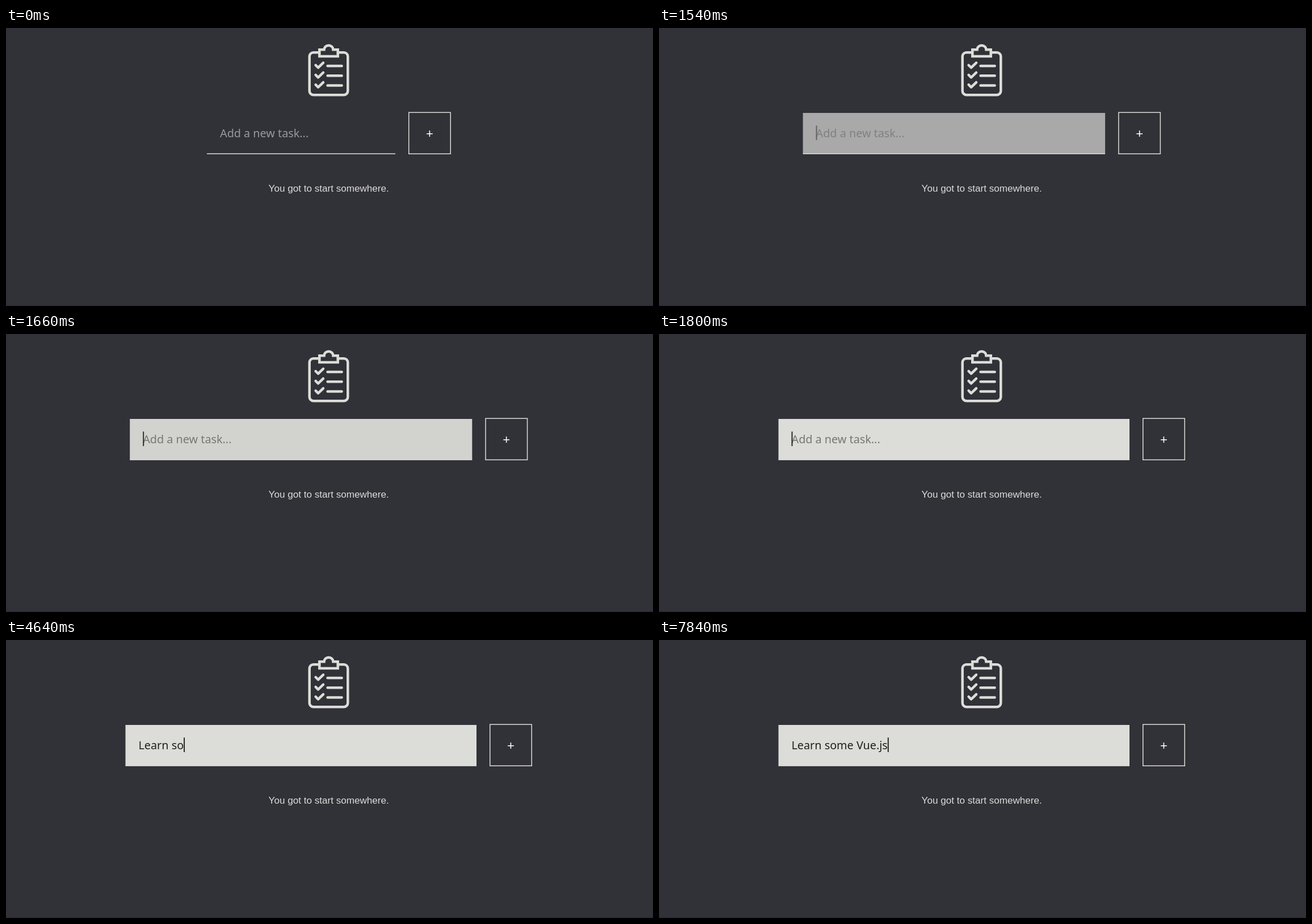
Recreate the animation shown at these times as an HTML page. Size 1140 px wide and 491 px high, loop 8 s.

```html
<!DOCTYPE html>
<html lang="en">
<head>
<meta charset="utf-8">
<title>Task list</title>
<style>
  html, body { margin: 0; width: 100%; height: 100%; overflow: hidden; background: #313138; }
  svg { display: block; width: 100%; height: 100%; }
  .outline { fill: none; stroke: #dcddd8; }
  .icon { stroke-width: 4.5; stroke-linecap: round; stroke-linejoin: round; }
  #entry { font: 19.8px "Noto Sans", sans-serif; }
  .plain { font-family: "Liberation Sans", Arial, sans-serif; }
</style>
</head>
<body>
<svg viewBox="0 0 1140 491">
  <rect y="490" width="1140" height="1" fill="#2a2a30"/>
  <g class="outline icon">
    <path d="M552 43.2H541.7a7 7 0 0 0-7 7v61a7 7 0 0 0 7 7h53.6a7 7 0 0 0 7-7v-61a7 7 0 0 0-7-7H585"/>
    <path stroke-linejoin="miter" d="M552.3 50V38.2h8.2a8 7.4 0 0 1 16 0h8.2V50z"/>
    <g id="row"><path d="M545.6 65.6l4.4 4.4 9-8.6M566.6 66.9h25"/></g>
    <use href="#row" y="17.3"/>
    <use href="#row" y="34.6"/>
  </g>
  <rect id="field" y="150" height="72"/>
  <rect id="underline" y="221.4" height="1.5" fill="#dcddd8"/>
  <text id="entry" y="193"></text>
  <rect id="caret" y="172.3" width="1.9" height="25.7"/>
  <g id="button">
    <rect class="outline" x=".75" y="149.15" width="73.5" height="73.1" stroke-width="1.5"/>
    <text class="plain" x="37.5" y="193.6" font-size="22" text-anchor="middle" fill="#fff">+</text>
  </g>
  <text class="plain" x="462.6" y="289.3" font-size="17.1" fill="#dcddd8">You got to start somewhere.</text>
</svg>
<script>
const LOOP = 8000;
const TASK = "Learn some Vue.js".replaceAll(" ", "\u00a0");
const KEY_TIMES = [2360, 2780, 3060, 3240, 3520, 3800, 4360, 4640, 4880,
                   5040, 5300, 6000, 6320, 6600, 7000, 7560, 7820];
const [field, underline, entry, caret, button] =
  ["field", "underline", "entry", "caret", "button"].map(id => document.getElementById(id));

const mix = (a, b, p) => a + (b - a) * p;

// cubic-bezier(.25, .1, .25, 1)
function ease(x) {
  let low = 0, high = 1, s = 0.5;
  for (let i = 0; i < 24; i++) {
    s = (low + high) / 2;
    if (0.75 * s * (1 - s) + s ** 3 < x) low = s; else high = s;
  }
  return 0.3 * s * (1 - s) ** 2 + 3 * (1 - s) * s * s + s ** 3;
}

// The field grows in bursts of three quick updates, then a pause.
function growth(t) {
  if (t < 1380) return 0;
  if (t >= 1800) return 1;
  const since = t - 1380;
  const burst = Math.floor(since / 140) * 140;
  const held = burst + Math.min(40, Math.floor((since - burst) / 20) * 20);
  return ease((held + 5) / 400);
}

function draw(t) {
  const p = growth(t);
  const left = mix(354, 210.5, p);
  const right = mix(686, 829, p);
  const ink = `rgb(${[242, 242, 240].map(c => Math.round(mix(c, 32, p)))})`;
  const typed = TASK.slice(0, KEY_TIMES.filter(k => t >= k).length);

  for (const bar of [field, underline]) {
    bar.setAttribute("x", left);
    bar.setAttribute("width", right - left);
  }
  field.setAttribute("fill", `rgba(220,221,216,${p})`);
  button.setAttribute("transform", `translate(${right + 23})`);

  entry.textContent = typed || "Add a new task...";
  entry.setAttribute("x", left + 23);
  entry.setAttribute("fill", ink);
  entry.setAttribute("fill-opacity", typed ? 1 : 0.54);

  const advance = typed ? entry.getComputedTextLength() : 0;
  caret.setAttribute("x", left + 23 + advance);
  caret.setAttribute("fill", ink);
  caret.setAttribute("visibility", t >= 1000 ? "visible" : "hidden");
}

const start = performance.now();
function tick() {
  draw((performance.now() - start) % LOOP);
  requestAnimationFrame(tick);
}
tick();
</script>
</body>
</html>
```
